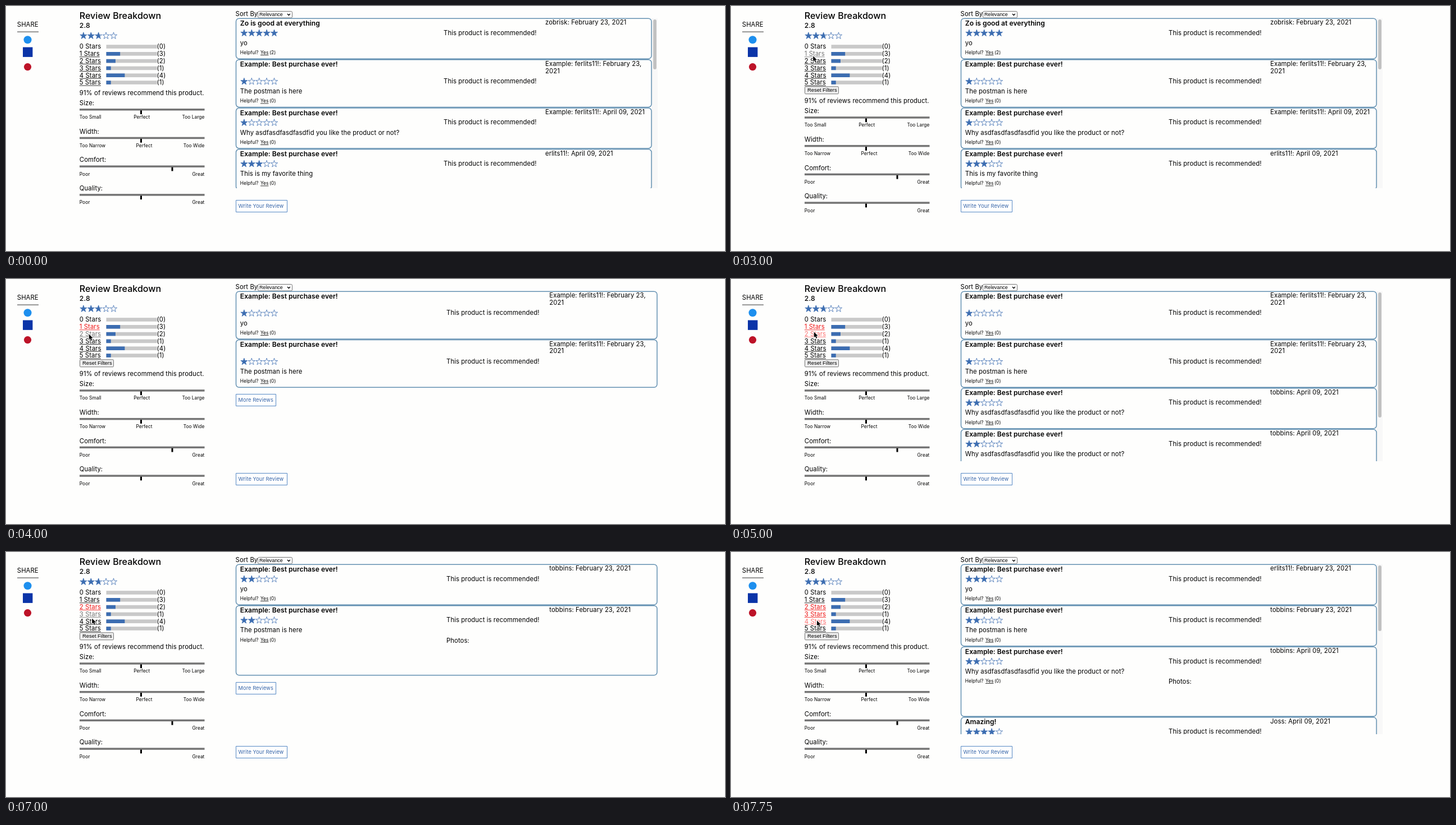
Write an HTML page with a canvas that moves like this. It is 1280x437 px and loops after 8000 ms.

```html
<!DOCTYPE html>
<html lang="en">
<head>
<meta charset="utf-8">
<title>Review Breakdown</title>
<style>
  html, body { margin: 0; width: 100%; height: 100%; overflow: hidden; background: #fefefd; }
  canvas { display: block; width: 1280px; height: 437px; }
</style>
</head>
<body>
<canvas id="stage" width="1280" height="437"></canvas>
<script>
const ctx = document.getElementById('stage').getContext('2d');
const LOOP = 8000;
const BLUE = '#3c6db1', EDGE = '#6491b2', INK = '#000';
const SANS = 'Inter, sans-serif', UI = '"Liberation Sans", Arial, sans-serif';
const ROW = 12.8, CARD = 73.5, PHOTO = 52.1;
const LIST_TOP = 22, LIST_END = 325;

// Reviews: title, stars, byline ("|" breaks the line), body, helpful votes, photos
const BEST = 'Example: Best purchase ever!';
const FEB = ': February 23, 2021', APR = ': April 09, 2021';
const LONG = 'Example: ferlits11!';
const WRAPPED = LONG + ': February 23,|2021';
const YO = 'yo', POST = 'The postman is here', FAV = 'This is my favorite thing';
const WHY = 'Why asdfasdfasdfasdfid you like the product or not?';
const review = (title, stars, by, body, votes = 0, photos = false) =>
  ({ title, stars, by: by.split('|'), body, votes, photos });

const ones = [review(BEST, 1, WRAPPED, YO), review(BEST, 1, WRAPPED, POST)];
const twoThree = [
  review(BEST, 3, 'erlits11!' + FEB, YO),
  review(BEST, 2, 'tobbins' + FEB, POST),
  review(BEST, 2, 'tobbins' + APR, WHY, 0, true)
];
// thumb: lower end of the scrollbar thumb, 0 without scrollbar
const lists = {
  all: { thumb: 113, items: [
    review('Zo is good at everything', 5, 'zobrisk' + FEB, YO, 2),
    review(BEST, 1, WRAPPED, POST),
    review(BEST, 1, LONG + APR, WHY),
    review(BEST, 3, 'erlits11!' + APR, FAV)] },
  one: { thumb: 0, items: ones },
  oneTwo: { thumb: 247, items: [...ones,
    review(BEST, 2, 'tobbins' + APR, WHY),
    review(BEST, 2, 'tobbins' + APR, WHY)] },
  two: { thumb: 0, items: [
    review(BEST, 2, 'tobbins' + FEB, YO),
    review(BEST, 2, 'tobbins' + FEB, POST, 0, true)] },
  twoThree: { thumb: 322, items: twoThree },
  twoToFour: { thumb: 141, items: [...twoThree, review('Amazing!', 4, 'Joss' + APR, FAV)] }
};

// Each step changes some of the state from its time on
const steps = [
  [0, { list: 'all', on: [], hover: 0, reset: false, mouse: null }],
  [500, { mouse: [703.7, 65.7] }],
  [750, { mouse: [397.7, 125.7] }],
  [1000, { mouse: [340.7, 115.5] }],
  [1250, { mouse: [240.5, 99.6] }],
  [1500, { mouse: [146.2, 89.2] }],
  [2000, { hover: 1 }],
  [3000, { reset: true }],
  [3250, { list: 'one', on: [1] }],
  [3750, { hover: 2, mouse: [147.8, 97.5] }],
  [4000, { mouse: [147.8, 98.5] }],
  [5000, { list: 'oneTwo', on: [1, 2], mouse: [147.8, 94.6] }],
  [5250, { hover: 1, mouse: [147.8, 88.8] }],
  [5500, { mouse: [147.6, 89.8] }],
  [5750, { list: 'two', on: [2] }],
  [6000, { mouse: [147, 90.6] }],
  [6250, { hover: 3, mouse: [153.8, 108.6] }],
  [6500, { mouse: [153.8, 111] }],
  [6750, { mouse: [153.8, 114] }],
  [7000, { mouse: [153.2, 118.5] }],
  [7250, { list: 'twoThree', on: [2, 3] }],
  [7500, { hover: 4, mouse: [153, 122.2] }],
  [7750, { list: 'twoToFour', on: [2, 3, 4] }]
];

function stateAt(t) {
  return Object.assign({}, ...steps.filter(s => s[0] <= t).map(s => s[1]));
}

function rect(x, y, w, h, color) {
  ctx.fillStyle = color;
  ctx.fillRect(x, y, w, h);
}

function box(x, y, w, h, r, stroke, fill, width = 1) {
  ctx.beginPath();
  ctx.roundRect(x, y, w, h, r);
  if (fill) { ctx.fillStyle = fill; ctx.fill(); }
  if (stroke) { ctx.strokeStyle = stroke; ctx.lineWidth = width; ctx.stroke(); }
}

function disc(x, y, r, color) {
  ctx.beginPath();
  ctx.arc(x, y, r, 0, 2 * Math.PI);
  ctx.fillStyle = color;
  ctx.fill();
}

function text(str, x, y, { size = 11.3, weight = 400, color = INK, align = 'left',
                           family = SANS, space = 0.008, line = false } = {}) {
  ctx.font = `${weight} ${size}px ${family}`;
  ctx.letterSpacing = size * space + 'px';
  ctx.textAlign = align;
  ctx.fillStyle = color;
  ctx.fillText(str, x, y);
  if (line) ctx.fillRect(x, y + 1.2, ctx.measureText(str).width, 0.8);
}

const small = (str, x, y, more) => text(str, x, y, { size: 8.3, ...more });
const heading = (str, x, y, size, weight) => text(str, x, y, { size, weight, space: 0.002 });

function starPath(cx, cy) {
  ctx.beginPath();
  for (let i = 0; i < 10; i++) {
    const r = i % 2 ? 2.5 : 6.4, a = (i / 5 - 0.5) * Math.PI;
    ctx.lineTo(cx + r * Math.cos(a), cy + r * Math.sin(a));
  }
  ctx.closePath();
}

function stars(x, cy, value) {
  for (let i = 0; i < 5; i++) {
    const cx = x + 6.9 + i * 13.4, part = Math.min(1, Math.max(0, value - i));
    starPath(cx, cy + 0.4);
    ctx.strokeStyle = BLUE;
    ctx.lineWidth = 0.8;
    ctx.stroke();
    if (!part) continue;
    ctx.save();
    ctx.clip();
    rect(cx - 6.5, cy - 7, 13 * part, 14, BLUE);
    ctx.restore();
  }
}

function blueButton(label, x, y, w) {
  box(x + 0.5, y + 0.5, w - 1, 21, 0, '#5588c4', '#fff');
  text(label, x + 4.6, y + 14.4, { size: 9.25, color: '#3564a8' });
}

function share() {
  text('SHARE', 19.8, 36.6);
  rect(20, 45.6, 38, 1, '#333');
  disc(38.5, 60.3, 7, '#1d8fee');
  rect(30, 73.5, 17.4, 17.4, '#0b34a8');
  disc(38.5, 108.6, 6.6, '#bd1328');
}

function starRow(n, count, s) {
  const y = 72.4 + n * ROW, on = s.on.includes(n), hover = n > 0 && s.hover === n;
  const color = on ? (hover ? '#ff7474' : '#f01515') : hover ? '#757575' : INK;
  text(n + ' Stars', 130.8, y + 4, { color, line: n > 0 });
  rect(178.5, y - 3.2, 90.5, 6.6, '#c9c9c9');
  rect(178.5, y - 3.2, 90.5 * count / 11, 6.6, BLUE);
  text(`(${count})`, 268.6, y + 4);
}

function slider(name, y, tick, left, mid, midX, right) {
  text(name + ':', 130.8, y);
  rect(131, y + 6, 222.5, 3.5, '#757575');
  rect(tick, y + 9.2, 3, 6.8, '#000');
  small(left, 130.8, y + 24.2);
  small(mid, midX, y + 24.2, { align: 'center' });
  small(right, 353.4, y + 24.2, { align: 'right' });
}

function breakdown(s) {
  heading('Review Breakdown', 130.8, 23.2, 16, 500);
  text('2.8', 130.8, 39.2, { size: 12.2, weight: 500 });
  stars(131, 52.8, 2.7);
  [0, 3, 2, 1, 4, 1].forEach((count, n) => starRow(n, count, s));
  const dy = s.reset ? 14.2 : 0;
  if (s.reset) {
    box(131.5, 143.8, 60, 13, 1.5, '#767676', '#efefef');
    text('Reset Filters', 136, 153.4, { size: 9.4, family: UI, space: 0 });
  }
  text('91% of reviews recommend this product.', 130.8, 159 + dy);
  slider('Size', 177 + dy, 239, 'Too Small', 'Perfect', 241.7, 'Too Large');
  slider('Width', 227.7 + dy, 239, 'Too Narrow', 'Perfect', 246, 'Too Wide');
  slider('Comfort', 278.4 + dy, 294.5, 'Poor', '', 241, 'Great');
  slider('Quality', 329.1 + dy, 239, 'Poor', '', 241, 'Great');
}

function sortBar() {
  text('Sort By', 408.6, 18.4);
  box(448.5, 9.5, 61, 11.5, 2, '#767676', '#fff');
  text('Relevance', 451, 18.3, { size: 8.8, family: UI, space: 0 });
  ctx.beginPath();
  ctx.moveTo(501, 14);
  ctx.lineTo(503.4, 16.5);
  ctx.lineTo(505.8, 14);
  ctx.strokeStyle = '#000';
  ctx.lineWidth = 1.4;
  ctx.stroke();
}

// Draws a card at y and returns where the next one starts
function card(r, y, wide) {
  const extra = (r.by.length - 1) * ROW, low = y + extra;
  const height = CARD + extra + (r.photos ? PHOTO : 0);
  const midX = wide ? 784 : 779, byX = wide ? 967.3 : 960;
  box(409.5, y + 0.2, wide ? 749.6 : 739.6, height - 1.5, 5.5, EDGE, null, 1.5);
  heading(r.title, 416.8, y + 12.8, 12.1, 600);
  r.by.forEach((part, i) => text(part, byX, y + 11.3 + i * ROW));
  stars(417, low + 26, r.stars);
  text('This product is recommended!', midX, low + 29.6);
  text(r.body, 416.8, low + 47.8);
  small('Helpful?', 416.8, low + 64);
  small('Yes', 453, low + 64, { line: true });
  small(`(${r.votes})`, 469, low + 64);
  if (r.photos) text('Photos:', midX, low + 66);
  return y + height;
}

function reviews({ items, thumb }) {
  ctx.save();
  ctx.beginPath();
  ctx.rect(400, 20, 780, LIST_END - 20);
  ctx.clip();
  let y = LIST_TOP;
  for (const r of items) y = card(r, y, !thumb);
  blueButton('More Reviews', 409, Math.round(y + 10.7), 72);
  if (thumb) {
    rect(1150, LIST_TOP, 10, LIST_END - LIST_TOP, '#f8f8f8');
    rect(1150, LIST_TOP, 0.7, LIST_END - LIST_TOP, '#eee');
    box(1152.2, 24, 5.8, thumb - 24, 2.9, null, '#c1c1c1');
  }
  ctx.restore();
  blueButton('Write Your Review', 409, 346, 92);
}

function pointer([x, y]) {
  ctx.save();
  ctx.translate(x, y);
  ctx.beginPath();
  ctx.moveTo(0, 0);
  ctx.lineTo(0, 9.6);
  ctx.lineTo(2.2, 7.6);
  ctx.lineTo(3.9, 11.4);
  ctx.lineTo(5.5, 10.7);
  ctx.lineTo(3.9, 7);
  ctx.lineTo(6.9, 7);
  ctx.closePath();
  ctx.lineJoin = 'round';
  ctx.lineWidth = 1.4;
  ctx.strokeStyle = '#fff';
  ctx.stroke();
  ctx.fillStyle = '#000';
  ctx.fill();
  ctx.restore();
}

function draw(t) {
  const s = stateAt(t);
  rect(0, 0, 1280, 437, '#fefefd');
  share();
  breakdown(s);
  sortBar();
  reviews(lists[s.list]);
  if (s.mouse) pointer(s.mouse);
}

const start = performance.now();
function tick() {
  draw((performance.now() - start) % LOOP);
  requestAnimationFrame(tick);
}
tick();
</script>
</body>
</html>
```
